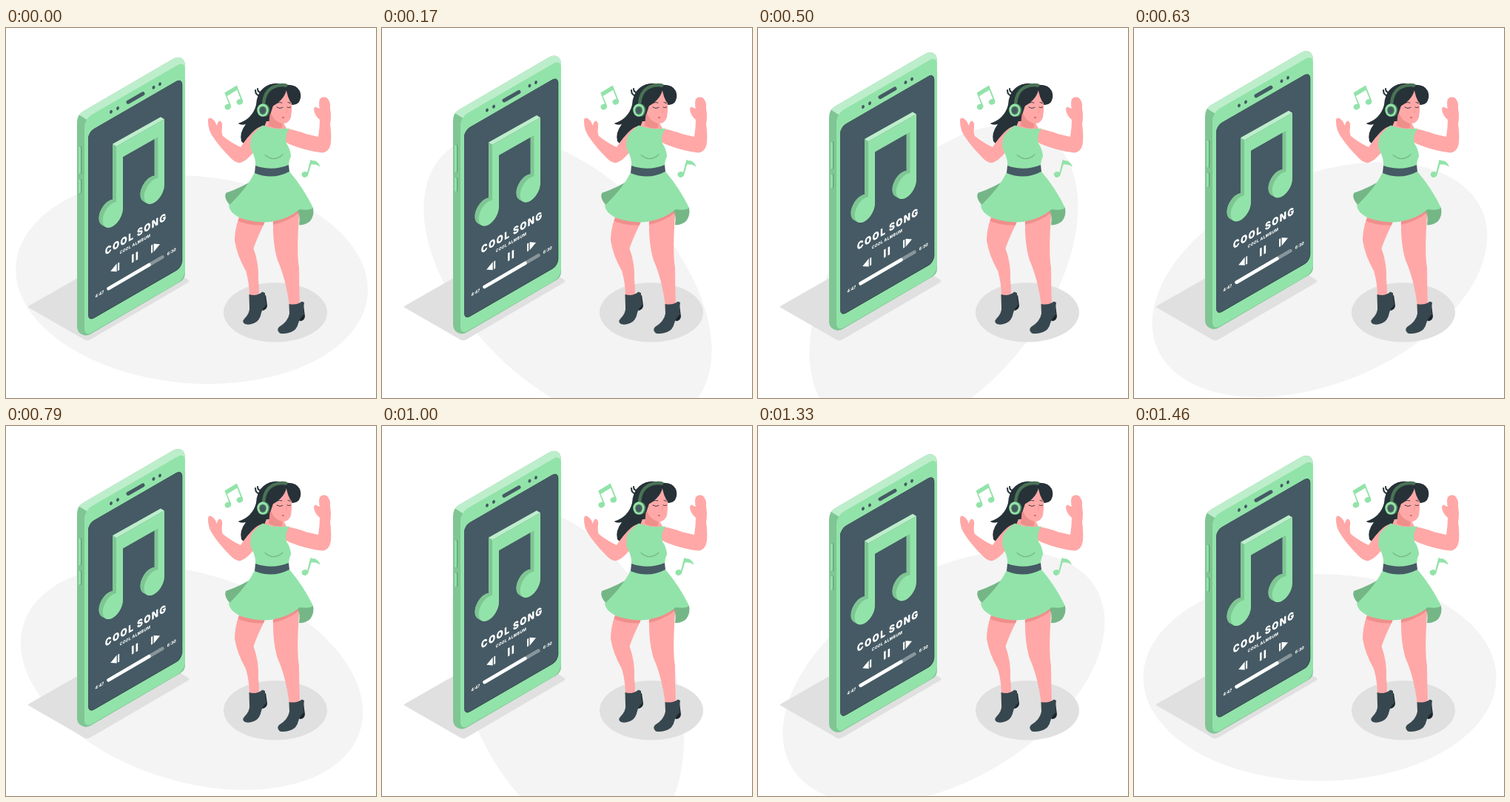
An HTML page with a canvas for the animation above (1.5 s loop, 500 by 500 pixels).

```html
<!DOCTYPE html>
<html lang="en">
<head>
<meta charset="utf-8">
<title>Cool song</title>
<style>
  html, body { margin: 0; width: 100%; height: 100%; overflow: hidden; background: #fff; }
  canvas { display: block; width: 100vw; height: 100vh; }
</style>
</head>
<body>
<canvas id="stage"></canvas>
<script>
const canvas = document.getElementById('stage');
const ctx = canvas.getContext('2d');
const dpr = window.devicePixelRatio || 1;
canvas.width = canvas.height = 500 * dpr;

const LOOP = 1500, STEPS = 36;
const GREEN = '#92e3a9', SIDE = '#7fc694', PALE = '#bdeecb', DEEP = '#5b9a70';
const FOLD = '#75b687', BAND = '#497255', SLATE = '#455a64';
const SKIN = '#ffa8a7', SKIN_DARK = '#ef8f8c';
const HAIR = '#263238', BOOT = '#37474f', SHADE = '#e0e0e0';

function fill(d, color) {
  ctx.fillStyle = color;
  ctx.fill(new Path2D(d));
}

function line(d, color, width) {
  ctx.strokeStyle = color;
  ctx.lineWidth = width;
  ctx.lineCap = 'round';
  ctx.stroke(new Path2D(d));
}

function oval(x, y, rx, ry, color, angle = 0) {
  ctx.fillStyle = color;
  ctx.beginPath();
  ctx.ellipse(x, y, rx, ry, angle, 0, 2 * Math.PI);
  ctx.fill();
}

function shifted(x, y, draw) {
  ctx.save();
  ctx.translate(x, y);
  draw();
  ctx.restore();
}

// Draws in the plane of the phone's front, with (x, y) as its zero point.
function onFront(x, y, draw) {
  ctx.save();
  ctx.transform(0.866, -0.5, 0, 1, x, y);
  draw();
  ctx.restore();
}

function plate(x, y, w, h, r, color) {
  onFront(x, y, () => {
    ctx.fillStyle = color;
    ctx.beginPath();
    ctx.roundRect(0, 0, w, h, r);
    ctx.fill();
  });
}

function label(text, x, y, size, weight, spacing = 0) {
  onFront(x, y, () => {
    ctx.font = `${weight} ${size}px Inter, sans-serif`;
    ctx.letterSpacing = spacing + 'px';
    ctx.textAlign = 'center';
    ctx.fillStyle = '#fff';
    ctx.fillText(text, spacing / 2, 0);
  });
}

function extrude(dx, dy, draw) {
  for (let s = 1; s >= 0; s -= 0.05) shifted(dx * s, dy * s, draw);
}

function drawFloor(p) {
  oval(251, 340, 238.5, 140, '#f4f4f4', p * 2 * Math.PI);
  fill('M30 376 L100 336 L236 334 L246 340 Q249 342 246 344 L114 421 Q109 424 104 420 L31 378 Q29 377 30 376Z', SHADE);
  oval(364, 384.3, 70, 40.3, SHADE);
}

function drawBody() {
  const outline = 'M96 128 Q96 117.5 104 113 L225 42.5 Q232 38.5 237 41 Q242 44 242 52 V332 Q242 339.5 235 343.5 L114 414 Q108 417.5 102 414 Q96 411 96 403Z';
  fill(outline, SIDE);
  ctx.save();
  ctx.clip(new Path2D('M90 112 L112 126 L260 60 V20 H90Z'));
  fill(outline, PALE);
  ctx.restore();
  plate(106, 123, 157, 294.5, 11, GREEN);

  for (const [top, bottom] of [[162, 196], [206, 222]]) {
    line(`M100.6 ${top} V${bottom}`, DEEP, 3.4);
    line(`M99.6 ${top} V${bottom}`, GREEN, 3);
  }

  plate(111, 141, 147, 256, 9, BOOT);
  plate(111, 141, 146, 255, 9, SLATE);

  for (const [x, y] of [[142, 113.5], [151, 108.7], [199.5, 80.5], [208, 76]])
    oval(x, y, 1.9, 2.5, SLATE, 0.4);
  line('M165 100.5 L185 89', SLATE, 5);
}

function drawBigNote() {
  const heads = [[144.3, 252.5], [200.3, 220.5]];
  const head = (x, y, color) => onFront(x, y, () => oval(0, 0, 15.7, 15.7, color));

  fill('M144 157 L149 160.5 V252 H144Z', SIDE);
  fill('M200.5 149 L206 146 V222 L200.5 218Z', SIDE);
  for (const [x, y] of heads) extrude(-5.3, -3, () => head(x, y, SIDE));
  for (const [x, y] of heads) head(x, y, GREEN);
  fill('M149 160.5 L214 123.5 V212.5 L205.5 221 V147.5 L158 174.5 V244.5 L149 253Z', GREEN);
  fill('M144 157 L209 120.5 L214 123.5 L149 160.5Z', PALE);
}

function drawPlayer() {
  label('COOL SONG', 175, 283.7, 13.8, 900, 1.5);
  label('COOL ALMBUM', 174.3, 294.2, 5.7, 800, 0.4);
  label('4:47', 126.3, 362, 5.8, 800);
  label('6:30', 223.8, 304.5, 5.8, 800);

  const skip = () => fill('M-6.8 -5.3 h2.4 v10.6 h-2.4Z M-2.8 -5.5 L7 0 L-2.8 5.5Z', '#fff');
  onFront(147.3, 325.5, () => { ctx.scale(-1, 1); skip(); });
  onFront(174, 310, () => fill('M-4.6 -5.5 h3 v11 h-3Z M1.8 -5.5 h3 v11 h-3Z', '#fff'));
  onFront(202, 296, skip);

  line('M138.5 352.4 L211.5 309.8', '#88969c', 4.6);
  line('M138.5 352.4 L193.5 320.3', '#fff', 4.6);
}

function drawPhone() {
  drawBody();
  drawBigNote();
  drawPlayer();
}

function drawLegs() {
  fill('M315 255 Q309 273 309 287 Q312 307 324 328 Q329 345 329 363 L342 362 Q342 350 341 340 Q342 318 334.5 298 Q339 284 350 262Z', SKIN);
  fill('M361 256 Q360 292 367 314 Q378 338 383 376 L397 374 Q396 348 396 324 Q392 302 397 240Z', SKIN);
  fill('M315 257 L350 260 L348 266.5 Q328 267 314 261Z', SKIN_DARK);
  fill('M361 260 L397 244 L397 249 Q382 261 361 266Z', SKIN_DARK);

  fill('M344 364 L351 361 L353 375 Q353 380 347 382 L343 379Z', '#1c262b');
  fill('M328.5 360 Q339 363 346.5 356.5 L350 358 Q350 368 352 374 Q347 378 345 385 Q343 396 335 399 Q328 402 323 400 Q318 397 322 393 Q330 385 329 377Z', BOOT);
  fill('M396 376 L402 374 L404 390 Q403 396 397 396 L394 392Z', '#1c262b');
  fill('M382.5 373 Q393 375 400 369.5 L403 371 Q401 383 403 387 Q397 391 395 399 Q393 408 385 411 Q377 414 370 412.5 Q365 408 369 404 Q381 397 383 386Z', BOOT);
}

function drawArms() {
  fill('M273 126 Q273 119 279 123 Q283 126 285 132 Q286 126 289 125.5 Q293 127 292 134 Q291 142 293 146 Q304 155 317 161 Q327 146 336 138 Q342 133 348 132 L346 150 L336 166 Q326 179 317 182 Q311 183 304 176 Q288 160 279 146 Q273 137 273 126Z', SKIN);
  fill('M370 134 Q393 138 405 143 L422 147 Q424 135 424 124 Q417 118 416 110 Q417 104 421 108 L424 109 Q422 102 424 96 Q427 92 433 94 Q439 98 438 109 Q440 119 438 130 Q440 144 439 155 Q437 168 427 168.5 Q405 166 383 157 L370 150Z', SKIN);
}

function drawDress() {
  fill('M352 126 L374 126 L380 138 L347 138Z', SKIN);
  fill('M336 204 Q320 215 297 223 Q294 230 303 240 L325 230Z', FOLD);
  fill('M390 244 L415 243 Q417 253 411 261 Q404 267 396 266Q398 254 394 247Z', FOLD);
  fill('M347 131.5 Q363 138 383 135.5 Q376 146 379 156 Q385 165 385 174 Q382 179 382 188 Q358 196 337 188 Q338 178 333 168 Q328 160 332 146 Q339 137 347 131.5Z', GREEN);
  line('M350 171.5 Q362 182 374 171', FOLD, 1.2);
  fill('M336 195 Q326 216 301 240 Q302 249 315 256 Q336 264 358 262 Q382 258 397 245 Q410 247 415 243 Q402 216 383 194Z', GREEN);
  fill('M337 186 Q360 194 382 185 L383 194 Q360 206 336 196Z', SLATE);
}

function drawBackHair() {
  fill('M375 77 Q392 75 397 85 Q400 93 396 100 Q393 104 385 104 L374 100Z', HAIR);
  fill('M379 78 Q362 70 348 81 Q339 88 338 104 Q333 123 313.5 129 Q318 132 324 130 Q315 142 318 153 Q324 160 331 157 Q334 151 341 144 Q347 134 362 132 L372 112Z', HAIR);
  line('M344 92 Q337 91 337 84 M345 87 Q340 87 340 82', HAIR, 2);
}

function drawHead() {
  fill('M357 112 L374 124 L373 135 Q364 137 355 132Z', SKIN_DARK);
  fill('M377 81 Q385 88 386 98 Q387 110 385 121 Q381 130 374 129 Q363 127 359 117 Q353 112 358 106 Q371 103 377 81Z', SKIN);
  fill('M380 79 Q378 96 361 105 L357 117 L350 112 L352 88 Q364 74 380 79Z', HAIR);
  fill('M378 78 Q393 76 397 87 Q399 95 395 100 Q392 104 387 103 Q380 96 378 78Z', HAIR);

  line('M366 107 Q370 110 374 107.5', HAIR, 0.9);
  line('M380 107 Q382 108.5 384.5 107', HAIR, 0.9);
  line('M366 101.5 Q369 99.5 373 101', HAIR, 0.9);
  line('M381 100.5 L384.5 101.5', HAIR, 0.9);
  line('M378.5 108 Q381 113.5 378 114.5', SKIN_DARK, 0.8);
  oval(374.5, 121, 1.8, 1.1, '#d9696b');

  line('M348 104 Q349 85 362 79.5 Q370 76 378 77.5', BAND, 4.5);
  oval(350, 111, 6.5, 8.6, BAND);
  oval(347, 111, 7.7, 8.7, GREEN);
  oval(347, 111.3, 4.8, 5.6, BAND);
  oval(346.8, 111.4, 3.3, 4, SLATE);
}

function drawSmallNotes() {
  oval(300, 106.5, 4.3, 3.7, GREEN, -0.4);
  oval(316, 99.8, 4.3, 3.7, GREEN, -0.4);
  fill('M295.5 87.5 L312 77.5 L320.3 98.5 L318.5 99.3 L312.4 83.8 L298.8 92 L304.3 105 L302.5 106Z', GREEN);

  oval(404, 198, 4.3, 3.8, GREEN, -0.3);
  fill('M411.5 178 Q415 179.5 418 179.5 Q423 182 424.8 187.5 Q419 183.5 412.5 184.5 L408.4 198.5 L406.5 198Z', GREEN);
}

function drawGirl() {
  drawBackHair();
  drawLegs();
  drawArms();
  drawDress();
  drawHead();
}

const SHAKE = [0, -1, 2, -4, 4, -4, 4, -4, 2, -1, 0];

function shakeAt(p) {
  const i = Math.floor(p * 10), f = p * 10 - i;
  return SHAKE[i] + (SHAKE[i + 1] - SHAKE[i]) * f;
}

function render(ms) {
  // Motion is held in 24 even steps a second, from half a step in to a full turn.
  const step = Math.floor(((ms + 4) % LOOP) / LOOP * STEPS);
  const first = 0.5 / STEPS;
  const p = (first + (1 - first) * step / (STEPS - 1)) % 1;
  ctx.setTransform(dpr, 0, 0, dpr, 0, 0);
  ctx.fillStyle = '#fff';
  ctx.fillRect(0, 0, 500, 500);
  drawFloor(p);
  shifted(0, -10 * (1 - Math.abs(1 - 2 * p)), drawPhone);
  drawGirl();
  shifted(shakeAt(p), 0, drawSmallNotes);
}

const start = performance.now();
function tick() {
  render(performance.now() - start);
  requestAnimationFrame(tick);
}
tick();
</script>
</body>
</html>
```
